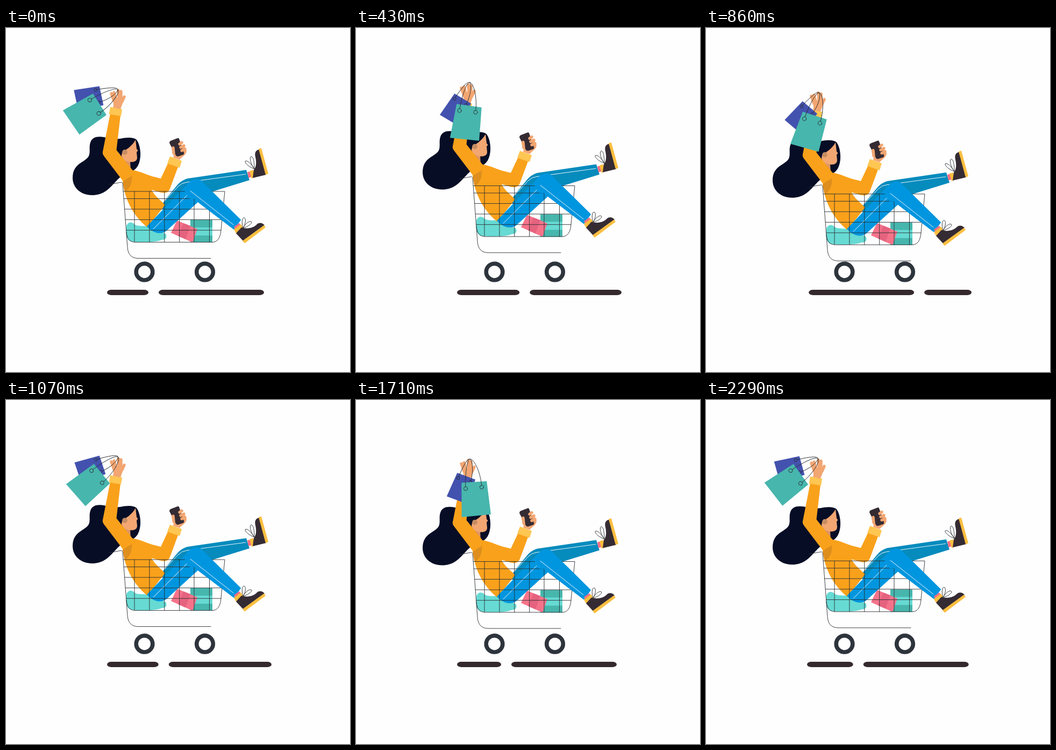
Write an HTML page that moves like this. It is 640x640 px and loops after 2.37 s.

```html
<!DOCTYPE html>
<html lang="en">
<head>
<meta charset="utf-8">
<title>Shopping cart ride</title>
<style>
html, body { margin: 0; width: 100%; height: 100%; overflow: hidden; background: #fefefe; }
svg { display: block; width: 100vw; height: 100vh; }
.line { fill: none; stroke: #2b2e33; stroke-width: .9; stroke-linecap: round; stroke-linejoin: round; }
.seam { fill: none; stroke: #eaf6fc; stroke-width: 1; stroke-linecap: round; }
.hair { fill: #060d25; }
.skin { fill: #f2a672; }
.top { fill: #f9a11b; }
.cuff { fill: #fec652; }
.jeans { fill: #0096df; }
.dark { fill: #352b33; }
.sole { fill: #fbbe40; }
.sock { fill: #f56f84; }
.teal { fill: #47b6ad; }
.mint { fill: #66dad3; }
.finger { fill: none; stroke: #f2a672; stroke-linecap: round; stroke-width: 5.4; }
</style>
</head>
<body>
<svg viewBox="0 0 640 640">
  <path id="road" fill="#34292c"/>
  <g fill="none" stroke="#2e343c" stroke-width="7.6">
    <circle cx="257.5" cy="453.7" r="15.3"/>
    <circle cx="370" cy="453.7" r="15.3"/>
  </g>

  <g id="ride">
    <!-- hair and face -->
    <path class="hair" d="M157 213C160 203 170 201 182 203C194 206 202 207 212 206C224 203 238 203 243 208C251 219 253 243 245 257C240 265 233 268 222 272C212 276 208 282 201 289C190 301 180 311 160 311C139 311 124 297 124 279C124 256 139 252 149 244C160 236 153 224 157 213Z"/>
    <path fill="#dd9565" d="M217 240L231 247L232 267L216 262Z"/>
    <path class="skin" d="M241 208L243 225L245.500 228L243 231L244 241C244 249 236 250 229 249C222 248 217 244 215 238L216 232C222 227 235 220 241 208Z"/>
    <circle cx="221" cy="231" r="4.8" fill="#c68c62"/>

    <!-- goods in the basket -->
    <rect class="teal" x="343" y="357" width="41" height="42"/>
    <rect class="mint" x="343" y="371" width="41" height="15"/>
    <path fill="#f5738a" d="M318 358L356 374L347 399L307 381Z"/>
    <path fill="#e5637f" d="M330 363L343 368L334 393L320 387Z"/>
    <path class="mint" d="M224 368C228 359 236 361 240 366C251 371 262 365 269 373C280 380 290 378 297 383C301 388 297 395 290 394C280 399 250 399 232 397C222 393 223 380 224 368Z"/>

    <!-- far leg -->
    <path fill="#068bbd" d="M286 332L318 293C324 286 330 282 338 280L447 264L453 283L385 304L345 312L300 345Z"/>
    <path class="seam" d="M292 325L320 295Q327 288 336 287L446 272"/>
    <path class="sock" d="M449 268L454 267L457 277L451 279Z"/>
    <path class="sole" d="M453 266L460 264L464 277L457 280Z"/>
    <path class="dark" d="M459 279L461 264C466 258 466 250 464 240C462 232 465 227 471 226L484 273Z"/>
    <path class="sole" d="M470 225L475 223.500L488 271L483 273Z"/>
    <path class="line" d="M462 262C452 259 444 251 445 248C448 245 456 252 462 262C456 255 452 241 456 239C461 239 462 252 462 262"/>

    <!-- torso and arms -->
    <path class="top" d="M233 264C248 266 260 272 272 276L288 280L304 246L321 256L305 299C302 306 297 308 288 306L271 301C275 311 288 321 296 329L263 371C242 354 221 325 217 284Z"/>
    <path fill="#dd8e1d" d="M217 286L234 274C235 285 233 297 221 305Z"/>
    <path class="top" d="M194 159L213 162L205.500 227L235 264L233 276L217 284L182 238Q179 234 180 230Z"/>
    <path class="cuff" d="M194 147L216 151L214 164L191.500 160Z"/>
    <path class="skin" d="M199 130L218 129C219 138 215 145 213 151L199 148C201 142 199 137 199 130Z"/>
    <path class="finger" d="M201 136L196 122M204 132L201 120M210 132L209 116M214 131L214 118M216 137L220 128"/>

    <path class="skin" d="M308 222C308 217 313 217 314 223L330 217L336 228C336 236 328 239 323 245L311 241C314 235 308 230 308 222Z"/>
    <path class="dark" d="M306 210L319 205Q321 204 322 206L331 232Q332 235 329 236L320 239Q317 239 316 237L304 214Q304 211 306 210Z"/>
    <path class="finger" d="M323 216L327 213M325 222L331 219M327 228L333 225M312 233L311 223"/>
    <path class="cuff" d="M305 239L327 247L323 260L300 252Z"/>

    <!-- near leg -->
    <path class="jeans" d="M262 369L337 291C344 282 354 278 363 284L437 357L424 375L357 324L300 376C290 386 273 382 262 369Z"/>
    <path class="seam" d="M274 374L337 311"/>

    <!-- cart -->
    <path id="grid" class="line"/>
    <path class="line" d="M192 291L215 287L217 289L226 408C227 422 234 428.500 246 428.500H381M218 304H407L400 376C399 391 393 398.500 384 398.500H240C229 398 225 391 224 380"/>

    <!-- shin over the basket rim -->
    <path class="jeans" d="M332 306L337 291C344 282 354 278 363 284L437 357L424 375L357 324L350 318H342Z"/>
    <path class="seam" d="M343 303L423 366"/>
    <path class="sock" d="M424 370L434 363L437 367L427 375Z"/>
    <path class="sole" d="M424 375L437 365L441 371L428 382Z"/>
    <path class="dark" d="M428 382L438 371C447 374 458 373 465 367C469 362 476 361 481 367L441 396Z"/>
    <path class="sole" d="M440 396L480 367L483 371L444 400.500Z"/>
    <path class="line" d="M441 372C438 362 439 353 443 353C447 354 446 365 441 372C445 364 454 357 457 361C457 365 449 370 441 372"/>

    <!-- bags hang from the origin -->
    <g id="small">
      <path fill="#4352ae" d="M-13 32H23L25 80H-16Z"/>
      <path class="line" d="M-8 38C-7 18 -5 0 0 0S14 16 16 37"/>
      <circle class="line" cx="-8" cy="40.500" r="2.700"/>
      <circle class="line" cx="16" cy="39.500" r="2.700"/>
    </g>
    <g id="large">
      <path class="teal" d="M-18 43L29 43L33 105L-21.500 107Z"/>
      <path class="line" d="M-11 51C-10 24 -5 0 1 0S18 22 19 50"/>
      <circle class="line" cx="-11" cy="54.500" r="3.500"/>
      <circle class="line" cx="19" cy="53.500" r="3.500"/>
    </g>
  </g>
</svg>
<script>
const LOOP = 2370, FPS = 14, COUNT = 33;
const HOP = COUNT / 4, SWING = COUNT / 2;
const el = id => document.getElementById(id);
const smooth = u => u * u * (3 - 2 * u);

// height over one hop: sink, rest, spring up, settle
const HOPS = [[0, 0], [1.75, 1.5], [2.25, 6.5], [3.5, 6.5], [6, -10.5], [HOP, 0]];

function hopHeight(phase) {
  const i = HOPS.findIndex(([p]) => p > phase);
  const [p0, y0] = HOPS[i - 1], [p1, y1] = HOPS[i];
  return y0 + (y1 - y0) * (phase - p0) / (p1 - p0);
}

// dashes run left, one pitch per hop, inside a fixed window
function roadPath(shift) {
  const dash = 196, pitch = 215, left = 188, right = 494, cap = 8;
  let d = "";
  for (let k = 0; k < 4; k++) {
    const start = 69 + pitch * k - shift;
    const a = Math.max(left, start) + cap;
    const b = Math.min(right, start + dash) - cap;
    if (b > a) d += `M${a} 487H${b}a${cap} 5 0 0 1 0 10H${a}a${cap} 5 0 0 1 0 -10Z`;
  }
  return d;
}

function gridPath() {
  let d = "M219 317.5H350V398.5";
  for (let i = 0; i < 3; i++) {
    d += `M${220.5 + i * 1.5} ${337 + i * 19.6}H${404 - i * 2}`;
  }
  for (const i of [0, 1, 2, 3, 5]) d += `M${239 + i * 27.9} 304V398.5`;
  return d;
}

function draw(now) {
  const t = Math.floor((now % LOOP) / 10) * 10 + 5;
  const step = Math.min(COUNT - 1, Math.floor(t * FPS / 1000));
  const hop = step % HOP;
  const bounce = hopHeight(hop);
  const sway = Math.cos(2 * Math.PI * (step - 0.3) / SWING);
  const x = 209.8 - 2 * sway, y = 114.3 + bounce / 4;
  const hang = (id, angle) =>
    el(id).setAttribute("transform", `translate(${x} ${y}) rotate(${angle})`);

  el("ride").setAttribute("transform", `translate(0 ${bounce})`);
  hang("large", 26 + 32 * sway);
  hang("small", 48 + 30 * sway);
  el("road").setAttribute("d", roadPath(215 * smooth(hop / HOP)));
}

el("grid").setAttribute("d", gridPath());
const begin = performance.now();
function tick() {
  draw(performance.now() - begin);
  requestAnimationFrame(tick);
}
tick();
</script>
</body>
</html>
```
